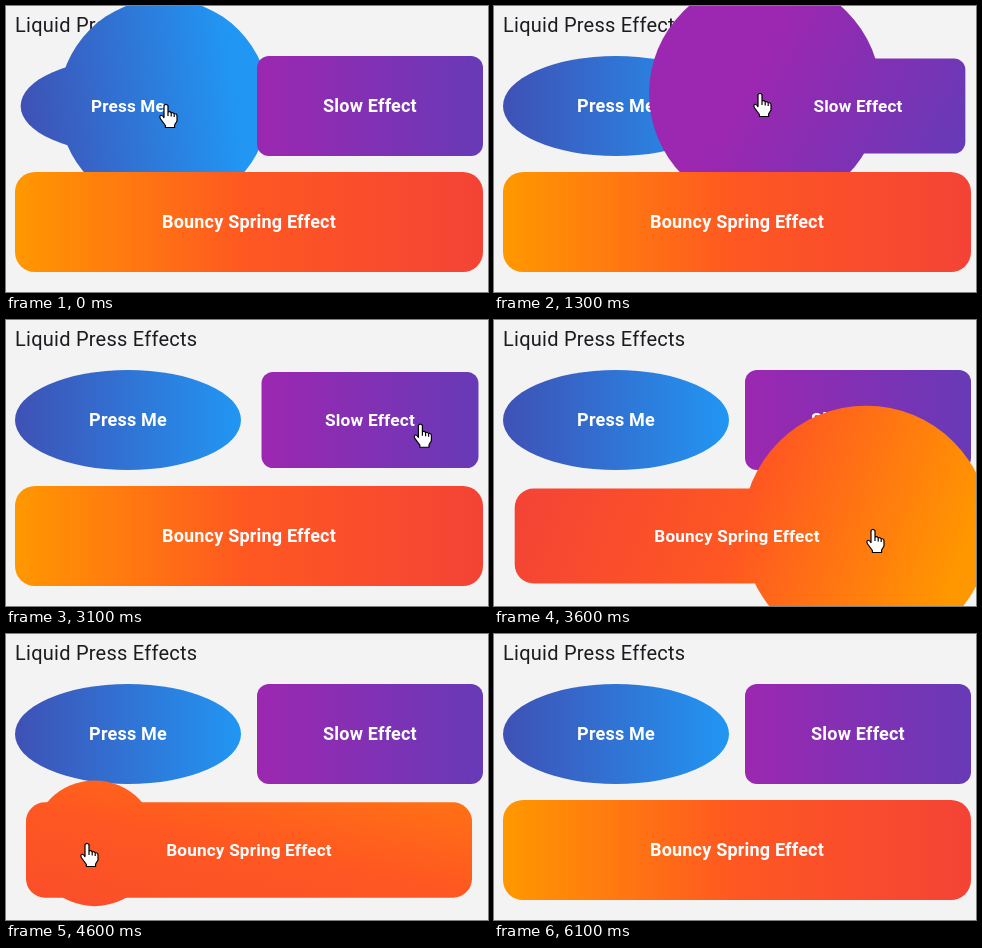
An HTML page for the animation above (6300 ms loop, 482 by 286 pixels).

```html
<!DOCTYPE html>
<html lang="en">
<head>
<meta charset="utf-8">
<title>Liquid Press Effects</title>
<style>
  html, body { margin: 0; width: 100%; height: 100%; overflow: hidden; background: #f3f3f3; }
  svg { display: block; width: 482px; height: 286px; }
  text { font-family: Roboto, sans-serif; }
  .title { font-size: 20px; letter-spacing: .25px; fill: #1d1b20; }
  .label { font-size: 18px; font-weight: 700; letter-spacing: .2px; fill: #fff; text-anchor: middle; }
</style>
</head>
<body>
<svg id="stage" viewBox="0 0 482 286">
  <text class="title" x="9" y="26">Liquid Press Effects</text>
  <g id="buttons"></g>
  <path id="hand" fill="#fff" stroke="#000" stroke-width="1.2" stroke-linejoin="round"
    d="M-2 1.6Q0-1 2 1.6V8Q4 7 5.2 8.8Q7.2 8 8.2 9.8Q11 9.4 11 12V17L8.6 21V23.5H-.6V21.5L-5.4 15Q-7 12-5 11.3Q-3.6 11-2 13.6ZM2 8V12M5.2 9V12.5M8.2 10V13"/>
</svg>
<script>
const LOOP = 6300, STEP = 100;
const PRESSED_SCALE = 0.95, PRESS_MS = 65, RELEASE_MS = 250, GROW_MS = 2000;
const HAND_HIDES_AT = 6100;

// Each press is [start, end] in ms.
const buttons = [
  { label: 'Press Me', x: 9, y: 50, w: 226, rx: 113, ry: 50,
    colors: ['#3f51b5', '#2196f3'], presses: [[-195, 450]] },
  { label: 'Slow Effect', x: 251, y: 50, w: 226, rx: 12, ry: 12,
    colors: ['#9c27b0', '#673ab7'], presses: [[1078, 1850], [2364, 3050]] },
  { label: 'Bouncy Spring Effect', x: 9, y: 166, w: 468, rx: 20, ry: 20,
    colors: ['#ff9800', '#ff5722', '#f44336'], presses: [[3490, 4250], [4539, 5550]] }
];
const HEIGHT = 100;

// Pointer path: time, x, y
const route = [
  [450, 160, 98], [1000, 266, 87], [1850, 266, 87], [2300, 416, 99], [3050, 416, 99],
  [3450, 379, 209], [4250, 379, 209], [4500, 81, 209], [5550, 81, 209], [5800, 149, 82]
];

const clamp = v => Math.min(1, Math.max(0, v));
const smooth = u => u * u * (3 - 2 * u);
const elasticOut = u => u <= 0 ? 0 : 1 + 2 ** (-10 * u) * Math.sin((u - 0.1) * 5 * Math.PI);

function add(parent, tag, attrs = {}) {
  const node = document.createElementNS('http://www.w3.org/2000/svg', tag);
  set(node, attrs);
  return parent.appendChild(node);
}

function set(node, attrs) {
  for (const name in attrs) node.setAttribute(name, attrs[name]);
}

function build(b, index) {
  b.cx = b.x + b.w / 2;
  b.cy = b.y + HEIGHT / 2;
  b.group = add(document.getElementById('buttons'), 'g');
  b.gradient = add(b.group, 'linearGradient', {
    id: 'fill' + index, gradientUnits: 'userSpaceOnUse',
    x1: b.x, x2: b.x + b.w, y1: b.cy, y2: b.cy
  });
  b.colors.forEach((color, i) => add(b.gradient, 'stop', {
    offset: i / (b.colors.length - 1), 'stop-color': color
  }));
  const fill = `url(#fill${index})`;
  add(b.group, 'rect', { x: b.x, y: b.y, width: b.w, height: HEIGHT, rx: b.rx, ry: b.ry, fill });
  b.blob = add(b.group, 'circle', { fill });
  add(b.group, 'text', { class: 'label', x: b.cx, y: b.cy + 6 }).textContent = b.label;
}

function pointerAt(t) {
  const next = route.findIndex(stop => stop[0] > t);
  if (next === 0) return route[0].slice(1);
  if (next < 0) return route[route.length - 1].slice(1);
  const [t0, x0, y0] = route[next - 1], [t1, x1, y1] = route[next];
  const u = smooth((t - t0) / (t1 - t0));
  return [x0 + (x1 - x0) * u, y0 + (y1 - y0) * u];
}

function drawButton(b, t, [px, py]) {
  let depth = 0, grow = 0;
  for (const [start, end] of b.presses) {
    if (t < start) continue;
    depth = t < end ? clamp((t - start) / PRESS_MS) : 1 - clamp((t - end) / RELEASE_MS);
    grow = t < end ? elasticOut((t - start) / GROW_MS) : 0;
  }
  const scale = 1 - (1 - PRESSED_SCALE) * depth;
  set(b.group, { transform: `translate(${b.cx} ${b.cy}) scale(${scale}) translate(${-b.cx} ${-b.cy})` });
  set(b.gradient, { gradientTransform: `rotate(${grow * 360} ${b.cx} ${b.cy})` });
  set(b.blob, { cx: px, cy: py, r: Math.max(0, grow * b.w / 2) });
}

function draw(t) {
  const pointer = pointerAt(t);
  buttons.forEach(b => drawButton(b, t, pointer));
  set(document.getElementById('hand'), {
    transform: `translate(${pointer})`,
    visibility: t < HAND_HIDES_AT ? 'visible' : 'hidden'
  });
}

buttons.forEach(build);
draw(0);
const begin = performance.now();
function tick() {
  const t = (performance.now() - begin) % LOOP;
  draw(Math.floor(t / STEP) * STEP);
  requestAnimationFrame(tick);
}
requestAnimationFrame(tick);
</script>
</body>
</html>
```
